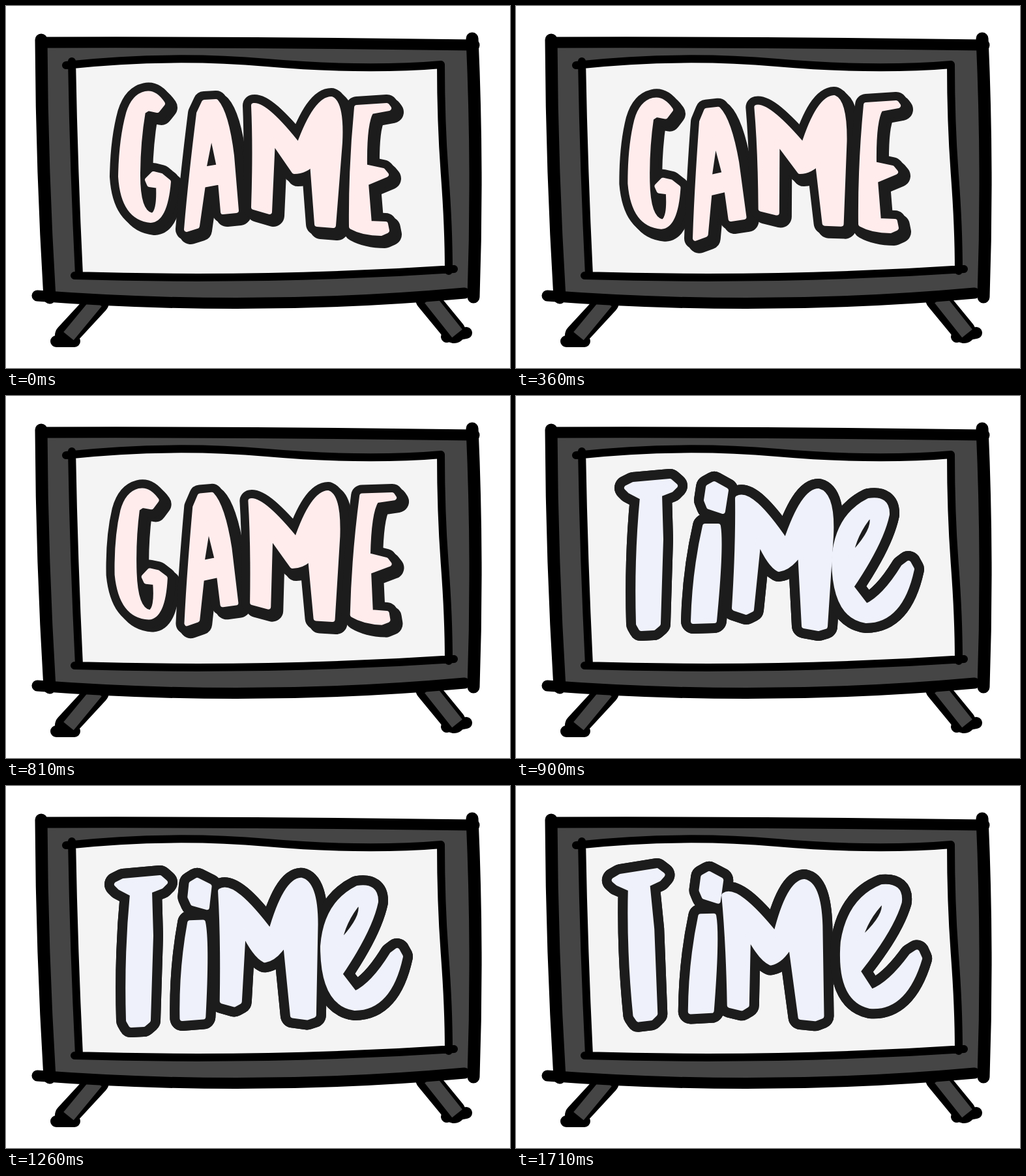
An HTML page for the animation above (1.8 s loop, 773x556 px).

```html
<!DOCTYPE html>
<html lang="en">
<head>
<meta charset="utf-8">
<title>Game time</title>
<style>
  html, body { margin: 0; width: 100%; height: 100%; overflow: hidden; background: #fff; }
  svg { display: block; width: 773px; height: 556px; }
  path { stroke-linejoin: round; }
  .ink { fill: none; stroke: #000; stroke-linecap: round; }
  .leg { fill: none; stroke: #454545; stroke-width: 20; }
  .word { fill-rule: evenodd; }
</style>
</head>
<body>
<svg viewBox="0 0 773 556">
  <!-- legs -->
  <path class="ink" stroke-width="36" d="M140 455L93 506M646 450L687 500"/>
  <path class="ink" stroke-width="18" d="M77 515L105 515M676 508L706 502"/>
  <path class="leg" d="M139 455L96 507M650 450L692 503"/>

  <!-- cabinet -->
  <path fill="#454545" d="M54 56L715 60L717 442Q380 470 67 446Z"/>
  <path class="ink" stroke-width="17" d="M54 56Q400 55 718 60M48 445Q380 470 703 441"/>
  <path class="ink" stroke-width="19" d="M54 52Q55 250 67 448M715 50Q724 250 717 447"/>

  <!-- screen -->
  <path fill="#f4f4f4" d="M101 89Q250 75 400 87T666 90Q667 180 673 260T678 406Q400 423 112 414Q104 250 101 89Z"/>
  <path class="ink" stroke-width="12" d="M92 91Q250 74 400 87T667 90Q667 180 673 260T679 407M101 85Q104 250 112 413M105 414Q400 423 687 404"/>

  <g id="words"></g>
</svg>
<script>
const STEP = 90, WORD_TIME = 900, LOOP = 1800;
const KEY_TIMES = [0, 360, 630, 810];
const ROUNDING = 8;

// A letter has a path, a pivot x and its sway [dx, dy, degrees] at the key times after rest.
const words = [
  {
    fill: '#ffecec', outline: 34, shadow: 6,
    letters: [
      { x: 212, sway: [[-1, 10, -1.2], [-6, 11, -2]],
        d: 'M240 150Q228 132 214 135Q196 139 188 165Q177 205 176 262Q180 325 222 329Q244 328 249 270L238 261L226 258L217 267L220 274L234 276Q236 318 224 322Q202 318 202 260Q202 210 210 162L218 157L232 160Z' },
      { x: 315, sway: [[-7, 12, -2.9], [-3, 5, -2]],
        d: 'M304 148L322 147Q338 165 346 230L353 314L333 316L329 270L302 275L293 338L277 343Q283 270 296 165ZM315 190L303 251L327 247Z' },
      { x: 445, sway: [[-7, 0, -2.3], [-3, 7, -1]],
        d: 'M380 153Q398 150 449 215Q475 143 499 143Q515 150 512 210L502 337L477 335L470 242Q458 254 442 254L409 206L404 316L380 309Q383 220 380 153Z' },
      { x: 555, sway: [[-1, -4, 0], [5, -2, 2]],
        d: 'M538 156L584 153L587 157L560 162Q549 180 550 247L578 253L583 259L552 272L557 334L582 335L584 345L575 349Q548 349 530 339Q529 250 538 156Z' },
    ],
  },
  {
    fill: '#eff1fb', outline: 38, shadow: 0,
    letters: [
      { x: 205, sway: [[0, 10, 0], [-6, 10, -2.3], [-12, 1, -4]],
        d: 'M170 141L180 136L236 131L244 138L238 144L220 151L222 220L218 350L211 356L192 357L188 350Q185 250 194 156L175 146Z' },
      { x: 297, sway: [[-6, 10, -2.5], [-4, 4, -1], [-6, 0, -1]],
        d: 'M295 140L304 135L322 145L317 177L296 170L292 160ZM290 200L310 200Q315 230 304 345L272 346Q274 270 290 200Z' },
      { x: 410, sway: [[-7, 1, -2.6], [-4, 8, -1], [-14, 5, -4.6]],
        d: 'M340 157Q360 145 414 224Q440 146 464 146Q486 152 483 215L474 354L464 357L442 353L436 240Q420 264 403 266Q388 258 372 220L361 328L353 332L335 326Q341 230 340 157Z' },
      { x: 545, sway: [[-2, -4, 0], [7, -2, 2], [14, -6, 4.5]],
        d: 'M541 161Q570 156 569 182Q560 225 514 293L537 323Q565 310 594 263L602 257L607 266Q590 345 537 345Q488 338 488 250Q493 185 541 161ZM544 181Q556 202 513 247Q518 212 544 181Z' },
    ],
  },
];

function add(parent, tag, attributes) {
  const node = document.createElementNS('http://www.w3.org/2000/svg', tag);
  for (const name in attributes) node.setAttribute(name, attributes[name]);
  return parent.appendChild(node);
}

for (const word of words) {
  const layer = (color, width, shift = 0) => add(word.group, 'g', {
    fill: color, stroke: color, 'stroke-width': width, transform: `translate(${shift} ${shift})`,
  });
  word.group = add(document.getElementById('words'), 'g', { class: 'word' });
  const layers = [
    layer('#1c1c1c', word.outline, word.shadow),
    layer('#1c1c1c', word.outline),
    layer(word.fill, ROUNDING),
  ];
  for (const letter of word.letters) {
    letter.parts = layers.map(parent => add(parent, 'path', { d: letter.d }));
  }
}

// Eases from one key pose to the next and holds the last one.
function poseAt(sway, time) {
  const poses = [[0, 0, 0], ...sway];
  const next = KEY_TIMES.findIndex((key, i) => key > time && i < poses.length);
  if (next < 0) return poses.at(-1);
  const k = (time - KEY_TIMES[next - 1]) / (KEY_TIMES[next] - KEY_TIMES[next - 1]);
  const eased = k * k * (3 - 2 * k);
  return poses[next].map((value, n) => poses[next - 1][n] * (1 - eased) + value * eased);
}

function draw() {
  const time = Math.floor(performance.now() % LOOP / STEP) * STEP;
  const current = Math.floor(time / WORD_TIME);
  words.forEach((word, i) => word.group.setAttribute('display', i === current ? 'inline' : 'none'));
  for (const { parts, sway, x } of words[current].letters) {
    const [dx, dy, angle] = poseAt(sway, time % WORD_TIME);
    for (const part of parts) {
      part.setAttribute('transform', `translate(${dx} ${dy}) rotate(${angle} ${x} 245)`);
    }
  }
  requestAnimationFrame(draw);
}
draw();
</script>
</body>
</html>
```
